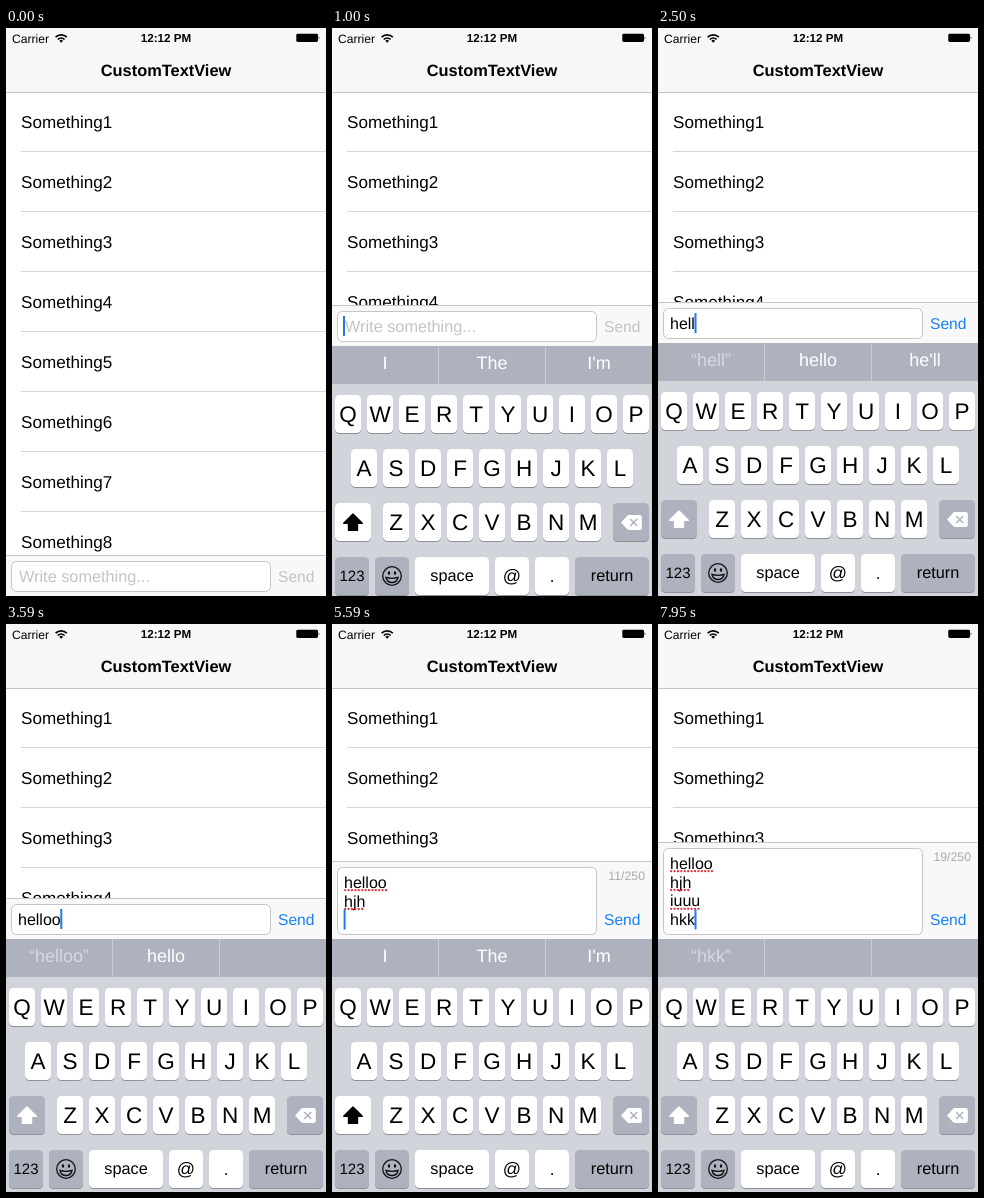
An HTML page that plays this animation: 320x568 px, repeating every 8 s.

```html
<!DOCTYPE html>
<html lang="en">
<head>
<meta charset="utf-8">
<title>CustomTextView</title>
<style>
html, body { margin: 0; width: 100%; height: 100%; overflow: hidden; background: #fff; }
svg { display: block; width: 100%; height: 100%; font-family: "Liberation Sans", Arial, sans-serif; text-rendering: geometricPrecision; }
text { white-space: pre; }
.mid { text-anchor: middle; }
.bold { font-weight: bold; }
.hint { fill: #fff; font-size: 18px; text-anchor: middle; }
.hint.quoted { fill: #d6d9df; }
.wavy { stroke: #e5333c; stroke-width: 2.3; stroke-linecap: round; stroke-dasharray: 0 3.4; }
</style>
</head>
<body>
<svg viewBox="0 0 320 568">
  <rect width="320" height="568" fill="#fff"/>
  <g id="list" font-size="17.1"></g>

  <rect width="320" height="64" fill="#f7f7f7"/>
  <rect y="64" width="320" height="1" fill="#c4c4c6"/>
  <text x="6" y="14.5" font-size="12.1">Carrier</text>
  <g fill="none" stroke="#000" stroke-width="1.7">
    <path d="M49.6 9.2a8 8 0 0 1 11.2 0M51.8 11.5a5 5 0 0 1 6.8 0"/>
    <path d="M55.2 14.8l-1.9-2a2.7 2.7 0 0 1 3.8 0z" fill="#000" stroke="none"/>
  </g>
  <text class="mid bold" x="160" y="14.3" font-size="11.6">12:12 PM</text>
  <rect x="290.3" y="5.8" width="21.7" height="8.2" rx="1.4" fill="#000"/>
  <path d="M312.7 8.2q1.6 1.6 0 3.4z"/>
  <text class="mid bold" x="160" y="48" font-size="16.4">CustomTextView</text>

  <g id="bar">
    <rect id="barBack" width="320" fill="#f8f8f8"/>
    <rect width="320" height="1" fill="#c6c6c8"/>
    <rect id="field" x="5.5" y="6.5" width="259" rx="5" fill="#fff" stroke="#c6c6ca"/>
    <text id="placeholder" x="13" y="26.6" font-size="16.3" fill="#c3c3c8">Write something...</text>
    <g id="lines" font-size="16"></g>
    <rect id="caret" width="2" height="20" fill="#1f7ae6"/>
    <text id="count" x="313" y="19" font-size="12.3" fill="#a9a9ad" text-anchor="end"></text>
    <text id="send" x="272" font-size="15.6">Send</text>
  </g>

  <g id="board">
    <rect y="315" width="320" height="253" fill="#d1d5db"/>
    <rect y="315" width="320" height="38" fill="#adb2be"/>
    <path d="M106.5 315v38M213.5 315v38" stroke="#c9cdd5"/>
    <g id="hintsOld"></g>
    <g id="hintsNew"></g>
    <g id="keys"></g>
    <path id="arrow" d="M21 483l9.3 9.3h-4.8v7h-9v-7h-4.8z" stroke-width="1.4" stroke-linejoin="round"/>
    <path d="M289 491.5l6-6.6q.7-.8 1.8-.8h11q2 0 2 2v10.8q0 2-2 2h-11q-1.1 0-1.8-.8z" fill="#fff"/>
    <path d="M298.2 488l7 7m0-7l-7 7" stroke="#adb2be" stroke-width="1.5"/>
    <g fill="none" stroke="#111" stroke-width="1.3">
      <circle cx="60" cy="545" r="9.3"/>
      <path d="M54 546.5q6 1.6 12 0-1 5-6 5t-6-5z"/>
      <path d="M57 541.3v1.4M63 541.3v1.4" stroke-width="2.2" stroke-linecap="round"/>
    </g>
  </g>
</svg>
<script>
const LOOP = 8000, FOCUS = 656, LINE = 18.8, HINT_LAG = 160;
const typed = "helloo\nhjh\niuuu\nhkk";
const times = [1680, 1860, 2040, 2220, 2620, 2900, 3600, 4300, 4640, 4730,
               5250, 5800, 6020, 6150, 6290, 6900, 7230, 7480, 7620];
const words = {
  "": ["I", "The", "I'm"],
  h: ["“h”", "he", "how"],
  he: ["“he”", "her", "hey"],
  hel: ["“hel”", "help", "hello"],
  hell: ["“hell”", "hello", "he'll"],
  hello: ["“hello”", "hellos", ""],
  helloo: ["“helloo”", "hello", ""],
  i: ["“i”", "I", "in"]
};

const $ = id => document.getElementById(id);
const el = (parent, tag, attrs, text = "") => {
  const node = document.createElementNS("http://www.w3.org/2000/svg", tag);
  for (const k in attrs) node.setAttribute(k, attrs[k]);
  node.textContent = text;
  return parent.appendChild(node);
};
const set = (id, attrs) => { for (const k in attrs) $(id).setAttribute(k, attrs[k]); };
const ramp = x => Math.min(1, Math.max(0, x));

for (let i = 0; i < 8; i++) {
  el($("list"), "text", { x: 15, y: 100 + 60 * i }, "Something" + (i + 1));
  el($("list"), "rect", { x: 15, y: 123 + 60 * i, width: 305, height: 1, fill: "#d6d6d9" });
}

function key(x, y, w, label, size, grey) {
  const shape = { x, width: w, height: 38, rx: 4.5 };
  el($("keys"), "rect", { ...shape, y: y + 1, fill: "#8e9197" });
  const face = el($("keys"), "rect", { ...shape, y, fill: grey ? "#adb2be" : "#fff" });
  el($("keys"), "text", { class: "mid", x: x + w / 2, y: y + 17.9 + size * 0.4, "font-size": size }, label);
  return face;
}
["QWERTYUIOP", "ASDFGHJKL", "ZXCVBNM"].forEach((row, r) =>
  [...row].forEach((c, i) => key([3, 19, 51][r] + 32 * i, 364 + 54 * r, 26, c, 22.5)));
const shift = key(3, 472, 36, "", 16, true);
key(281, 472, 36, "", 16, true);
key(3, 526, 34, "123", 15, true);
key(43, 526, 34, "", 16, true);
key(83, 526, 74, "space", 16.3);
key(163, 526, 34, "@", 18);
key(203, 526, 34, ".", 17);
key(243, 526, 74, "return", 16.3, true);

const hints = ["hintsOld", "hintsNew"].map(id =>
  [53, 160, 267].map(x => el($(id), "text", { x, y: 338.2 })));
const lines = [0, 1, 2, 3].map(i => ({
  text: el($("lines"), "text", { x: 12, y: 26.8 + LINE * i }),
  wavy: el($("lines"), "path", { class: "wavy" })
}));

const countAt = t => times.filter(k => k <= t).length;
const lastWord = n => typed.slice(0, n).split("\n").pop();

function showHints(nodes, n) {
  const word = lastWord(n), list = words[word] || ["“" + word + "”", "", ""];
  nodes.forEach((node, i) => {
    node.textContent = list[i];
    node.setAttribute("class", list[i][0] === "“" ? "hint quoted" : "hint");
  });
}

function drawText(n) {
  const rows = typed.slice(0, n).split("\n");
  lines.forEach(({ text, wavy }, i) => {
    text.textContent = rows[i] || "";
    const y = 29.2 + LINE * i;
    const done = i < rows.length - 1;
    wavy.setAttribute("d", done ? `M13.2 ${y}H${11.6 + text.getComputedTextLength()}` : "");
  });
  const row = rows.length - 1;
  const x = n ? 11.6 + lines[row].text.getComputedTextLength() : 11;
  set("caret", { x, y: 11 + LINE * row });
  set("placeholder", { opacity: n ? 0 : 1 });
  set("send", { fill: n ? "#1a80f2" : "#c3c3c8" });
  $("count").textContent = row ? n + "/250" : "";
  const caps = !lastWord(n);
  shift.setAttribute("fill", caps ? "#fff" : "#adb2be");
  set("arrow", { fill: caps ? "#000" : "#fff", stroke: caps ? "#000" : "#fff" });
}

function draw(t) {
  // critically damped spring lifts the keyboard
  const s = Math.max(0, t - FOCUS) / 1000 * 18.26;
  const drop = Math.round(253 * (1 + s) * Math.exp(-s));
  const grow = times.reduce((sum, k, i) =>
    typed[i] === "\n" ? sum + 18.7 * ramp((t - k) / 100) : sum, 0);
  set("board", { transform: `translate(0 ${drop})` });
  set("bar", { transform: `translate(0 ${Math.round(274.2 + drop - grow)})` });
  set("barBack", { height: 41 + grow });
  set("field", { height: 30 + Math.round(grow) });
  set("send", { y: 26.6 + grow });

  const n = countAt(t);
  drawText(n);

  const since = t - (n ? times[n - 1] : FOCUS), phase = since % 1000;
  const fade = phase < 900 ? 1 - ramp((phase - 750) / 80) : ramp((phase - 920) / 80);
  set("caret", { opacity: since < 0 ? 0 : fade });

  const m = countAt(t - HINT_LAG);
  const mix = m ? ramp((t - HINT_LAG - times[m - 1]) / 100) : 1;
  showHints(hints[0], Math.max(0, m - 1));
  showHints(hints[1], m);
  set("hintsOld", { opacity: 1 - mix });
  set("hintsNew", { opacity: mix });
}

const start = performance.now();
function tick() {
  draw((performance.now() - start) % LOOP);
  requestAnimationFrame(tick);
}
tick();
</script>
</body>
</html>
```
